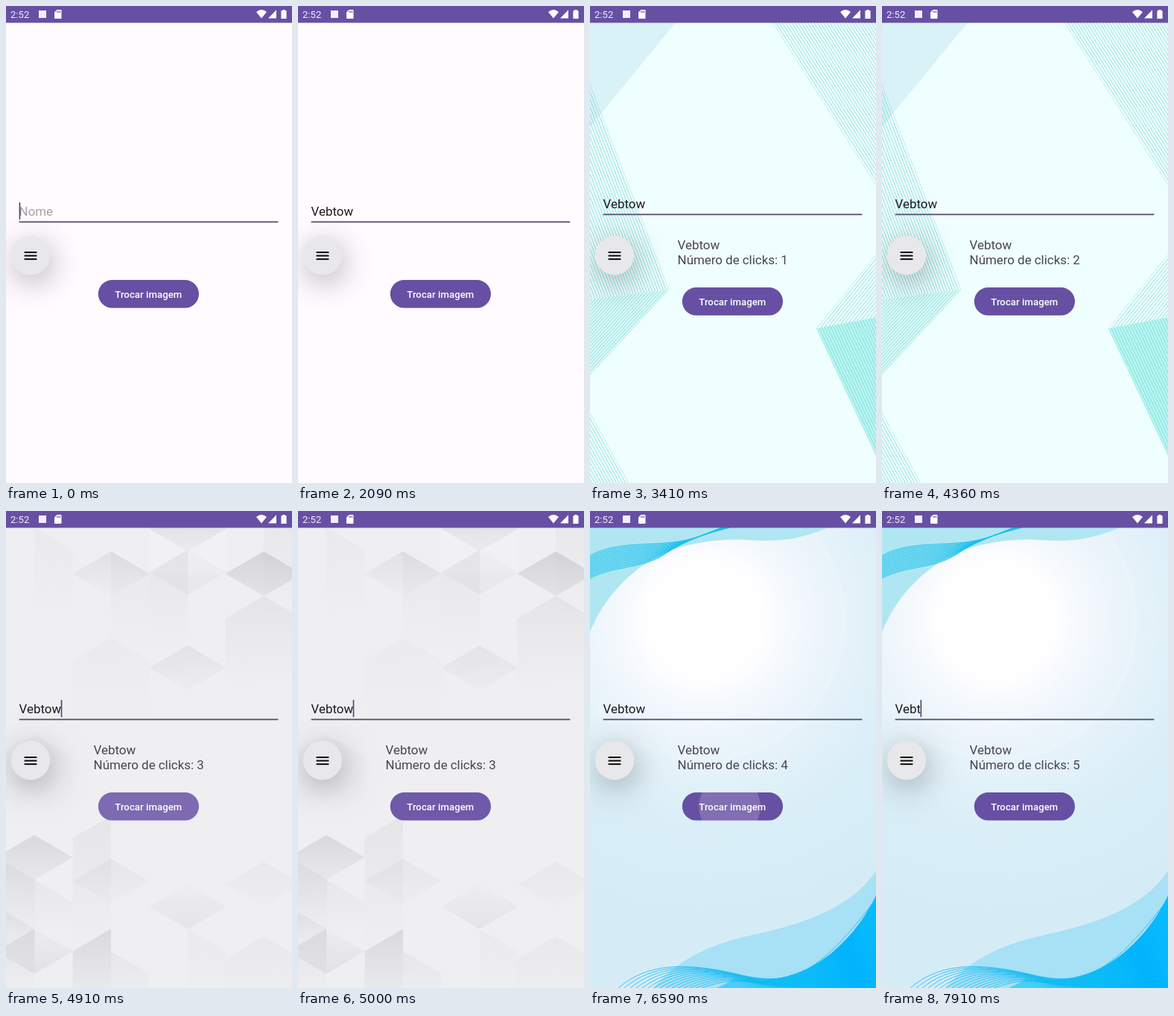
An HTML page with a canvas for the animation above (8 s loop, 384 px wide and 639 px high).

```html
<!DOCTYPE html>
<html lang="pt">
<head>
<meta charset="utf-8">
<title>Trocar imagem</title>
<style>
html, body { margin: 0; height: 100%; overflow: hidden; background: #fffbfe; }
canvas { display: block; width: 384px; height: 639px; }
</style>
</head>
<body>
<canvas id="stage" width="384" height="639"></canvas>
<script>
const c = document.getElementById('stage').getContext('2d');
const LOOP = 8000, W = 384, H = 639, PURPLE = '#6750a3';
const NAME = 'Vebtow';

// [time, letters in the field]
const typing = [[180, 1], [820, 2], [860, 3], [1050, 4], [1180, 5], [1590, 6], [7770, 5], [7910, 4]];
const blinks = [680, 820, 2090, 2590, 3320, 3820, 4320, 4820, 5450, 5770, 6270, 6770, 7270, 7770];
// [press, click, ripple gone]
const presses = [[2550, 3320, 3410], [4000, 4140, 4360], [4590, 4700, 5050], [5450, 5560, 5950], [6590, 6700, 6910]];
const sceneOfClick = [plain, hatched, hatched, cubes, waves, waves];

const clamp = v => Math.max(0, Math.min(1, v));

function fill(d, style) {
  c.fillStyle = style;
  c.fill(new Path2D(d));
}

function stroke(d, style, width) {
  c.strokeStyle = style;
  c.lineWidth = width;
  c.stroke(new Path2D(d));
}

function rect(x, y, w, h, style) {
  c.fillStyle = style;
  c.fillRect(x, y, w, h);
}

function text(s, x, y, size, style, weight = 400) {
  c.font = `${weight} ${size}px Roboto, sans-serif`;
  c.fillStyle = style;
  c.fillText(s, x, y);
}

function gradient(g, ...stops) {
  stops.forEach(([at, color]) => g.addColorStop(at, color));
  return g;
}

// A family of cubic curves between two outer ones, each given as 10 or 8 numbers
function fan(first, last, count, style, width) {
  let d = '';
  for (let i = 0; i < count; i++) {
    const p = first.map((v, k) => v + (last[k] - v) * i / (count - 1));
    d += `M${p.slice(0, 2)}C${p.slice(2, 8)}S${p.slice(8)}`;
  }
  stroke(d, style, width);
}

function plain() {
  rect(0, 0, W, H, '#fffbfe');
}

// Fills a polygon with lines parallel to (dx, dy), starting at (x, y)
function hatch(d, x, y, dx, dy, gap, tint) {
  c.save();
  c.clip(new Path2D(d));
  if (tint) rect(0, 0, W, H, tint);
  const len = Math.hypot(dx, dy), nx = -dy / len * gap, ny = dx / len * gap;
  let lines = '';
  for (let i = -70; i <= 70; i++) {
    const px = x + nx * i, py = y + ny * i;
    lines += `M${px - dx * 4} ${py - dy * 4}L${px + dx * 4} ${py + dy * 4}`;
  }
  stroke(lines, '#6bd2cd', .7);
  c.restore();
}

function hatched() {
  rect(0, 0, W, H, '#effeff');
  fill('M0 22H115L0 162Z', '#d9f2f7');
  hatch('M0 105L106 380L0 393Z', 0, 105, 106, 275, 3.6);
  hatch('M106 380L0 494V393Z', 106, 380, -106, 114, 3.2, '#d9f9f8');
  hatch('M0 545L52 639H0Z', 0, 545, 52, 94, 3.6);
  hatch('M245 22L384 240V22Z', 245, 22, 139, 218, 3.6);
  hatch('M304 432L384 333V417Z', 304, 432, 80, -99, 3.6);
  hatch('M304 432L384 417V602Z', 304, 432, 80, 170, 3.6, '#b9f6f2');
}

const grey = a => `rgba(110,110,118,${a})`;

// Shaded block: peak at (x, y), sloping sides, fading out downwards
function block(x, y, h, a, sides = 'LR') {
  const left = sides.includes('L') ? x - 51.5 : x;
  const right = sides.includes('R') ? x + 51.5 : x;
  const drop = px => y + Math.abs(px - x) * .58;
  const g = gradient(c.createLinearGradient(0, y, 0, y + h), [0, grey(a)], [1, grey(0)]);
  fill(`M${left} ${drop(left)}L${x} ${y}L${right} ${drop(right)}V${y + h}H${left}Z`, g);
}

function rhomb(x, y, a, b) {
  const g = gradient(c.createLinearGradient(0, y, 0, y + 60), [0, grey(a)], [1, grey(b)]);
  fill(`M${x} ${y}l51.5 30l-51.5 30l-51.5 -30Z`, g);
}

function cubes() {
  rect(0, 0, W, H, '#efeef1');
  block(38, 22, 120, .04, 'R');
  block(141, 54, 130, .05, 'R');
  rhomb(141, 54, .1, .01);
  rhomb(244, -6, .18, .05);
  rect(192, 22, 103, 62, 'rgba(255,255,255,.12)');
  block(244, 52, 130, .07, 'L');
  rhomb(244, 180, .09, .02);
  rhomb(244, 52, .02, .06);
  block(346, -10, 150, .06, 'R');
  rhomb(346, 54, .2, .09);
  block(346, 114, 120, .08);
  block(141, 170, 110, .03);
  block(38, 300, 110, .03);
  rhomb(38, 434, .17, .05);
  block(-13, 464, 100, .16, 'R');
  block(38, 494, 70, .06, 'R');
  block(141, 408, 180, .07, 'L');
  rhomb(141, 466, .07, .01);
  rhomb(38, 560, .02, .1);
  block(-13, 530, 70, .1, 'R');
  block(38, 560, 90, .09, 'L');
  block(141, 560, 110, .16, 'L');
  block(141, 590, 70, .07, 'R');
  rhomb(244, 500, .01, .08);
  block(244, 560, 90, .04, 'R');
  rhomb(346, 470, .05, .01);
  block(346, 570, 90, .05);
}

function waves() {
  rect(0, 0, W, H, gradient(c.createRadialGradient(154, 146, 0, 154, 146, 400),
    [0, '#fff'], [.2, '#fefeff'], [.26, '#f7fafe'], [.45, '#e8f3fa'], [.7, '#d9eef7'], [1, '#d5ecf7']));
  for (const r of [92, 106, 186]) {
    stroke(`M${154 - r} 146a${r} ${r} 0 1 0 ${2 * r} 0a${r} ${r} 0 1 0 ${-2 * r} 0`, 'rgba(255,255,255,.12)', 6);
  }

  fill('M0 22H320C285 37 255 42 215 39C175 36 130 43 97 57C50 82 18 118 0 162Z', '#b0e6f1');
  fill('M0 60C30 42 75 46 110 42S160 28 180 22H186C150 32 130 42 100 58C70 78 35 72 0 90Z', 'rgba(0,190,240,.15)');
  fan([0, 60, 30, 42, 75, 46, 110, 42, 160, 28, 178, 22],
    [0, 90, 35, 72, 70, 78, 100, 58, 150, 32, 188, 22], 14, '#19c0ee', .9);

  fill('M384 482C352 530 292 552 218 568C155 582 118 602 85 639H384Z', '#a8e0f5');
  fill('M384 515C362 560 330 594 292 613C258 629 230 630 195 627L170 639H384Z',
    gradient(c.createLinearGradient(200, 639, 384, 560), [0, '#4ccdf5'], [.35, '#10c0fb'], [.75, '#00b2ff'], [1, '#08bbff']));
  fan([38, 639, 75, 607, 125, 603, 200, 621, 310, 616, 384, 520],
    [150, 639, 180, 628, 200, 628, 230, 634, 330, 635, 384, 632], 15, '#0fbaf2', .8);
}

function statusBar() {
  rect(0, 0, W, 22.5, PURPLE);
  text('2:52', 6, 16.3, 13.1, '#f3edff');
  rect(44, 6, 10, 10, '#f3edff');
  fill('M68.5 5H73.5Q74.5 5 74.5 6V16Q74.5 17 73.5 17H66Q65 17 65 16V8.5Z', '#fff');
  for (const x of [68.3, 70.2, 72.1]) rect(x, 6.5, 1, 2.5, PURPLE);
  fill('M343 16.5L336 8Q343 2.2 350 8ZM352 16.5H363V5.2Z', '#fff');
  fill('M371.3 5H374.7V6.2H376.6V17H369.4V6.2H371.3Z', '#fff');
}

function fab() {
  c.save();
  c.shadowColor = 'rgba(0,0,0,.3)';
  c.shadowBlur = 42;
  c.shadowOffsetX = 3;
  c.shadowOffsetY = 10;
  c.fillStyle = '#e8e8eb';
  c.beginPath();
  c.arc(33, 334, 26.2, 0, 7);
  c.fill();
  c.restore();
  for (const y of [329, 333.6, 338.2]) rect(24.6, y, 16.8, 1.9, '#000');
}

function field(t, shift) {
  const step = typing.filter(s => s[0] <= t).pop();
  const value = NAME.slice(0, step ? step[1] : 0);
  const y = 281 - shift;
  text(value || 'Nome', 17.6, y, 16.9, value ? '#1c1b1f' : '#a4a1a8');
  rect(17.7, y + 7.4, 347.6, 1.8, '#5a5070');
  if (blinks.filter(b => b <= t).length % 2 === 0) {
    const x = value ? 17.2 + c.measureText(value).width : 17.6;
    rect(x, y - 18, 1.6, 23, '#4f4568');
  }
}

function button(t, shift) {
  const y = 367 + shift;
  c.save();
  c.beginPath();
  c.roundRect(123.8, y, 135.2, 37.6, 18.8);
  c.fillStyle = PURPLE;
  c.fill();
  c.clip();
  for (const [start, , end] of presses) {
    if (t < start || t >= end) continue;
    const grow = 1 - (1 - clamp((t - start) / 300)) ** 2;
    const fade = Math.min(1, (end - t) / 160);
    c.fillStyle = `rgba(255,255,255,${.17 * fade})`;
    c.beginPath();
    c.arc(187.5 + 3.9 * grow, y + 18.8, 41.3 + 30 * grow, 0, 7);
    c.fill();
  }
  c.restore();
  c.textAlign = 'center';
  c.letterSpacing = '0.09px';
  text('Trocar imagem', 191.3, y + 24, 13.1, '#fff', 500);
  c.letterSpacing = '0px';
  c.textAlign = 'left';
}

function draw(t) {
  const clicks = presses.filter(p => p[1] <= t).length;
  const shift = clicks ? 10 : 0;
  sceneOfClick[clicks]();
  statusBar();
  fab();
  field(t, shift);
  if (clicks) {
    text(NAME, 117.6, 326.2, 16.9, '#49454f');
    text(`Número de clicks: ${clicks}`, 117.6, 346, 16.9, '#49454f');
  }
  button(t, shift);
}

function frame() {
  draw(performance.now() % LOOP);
  requestAnimationFrame(frame);
}
frame();
</script>
</body>
</html>
```
